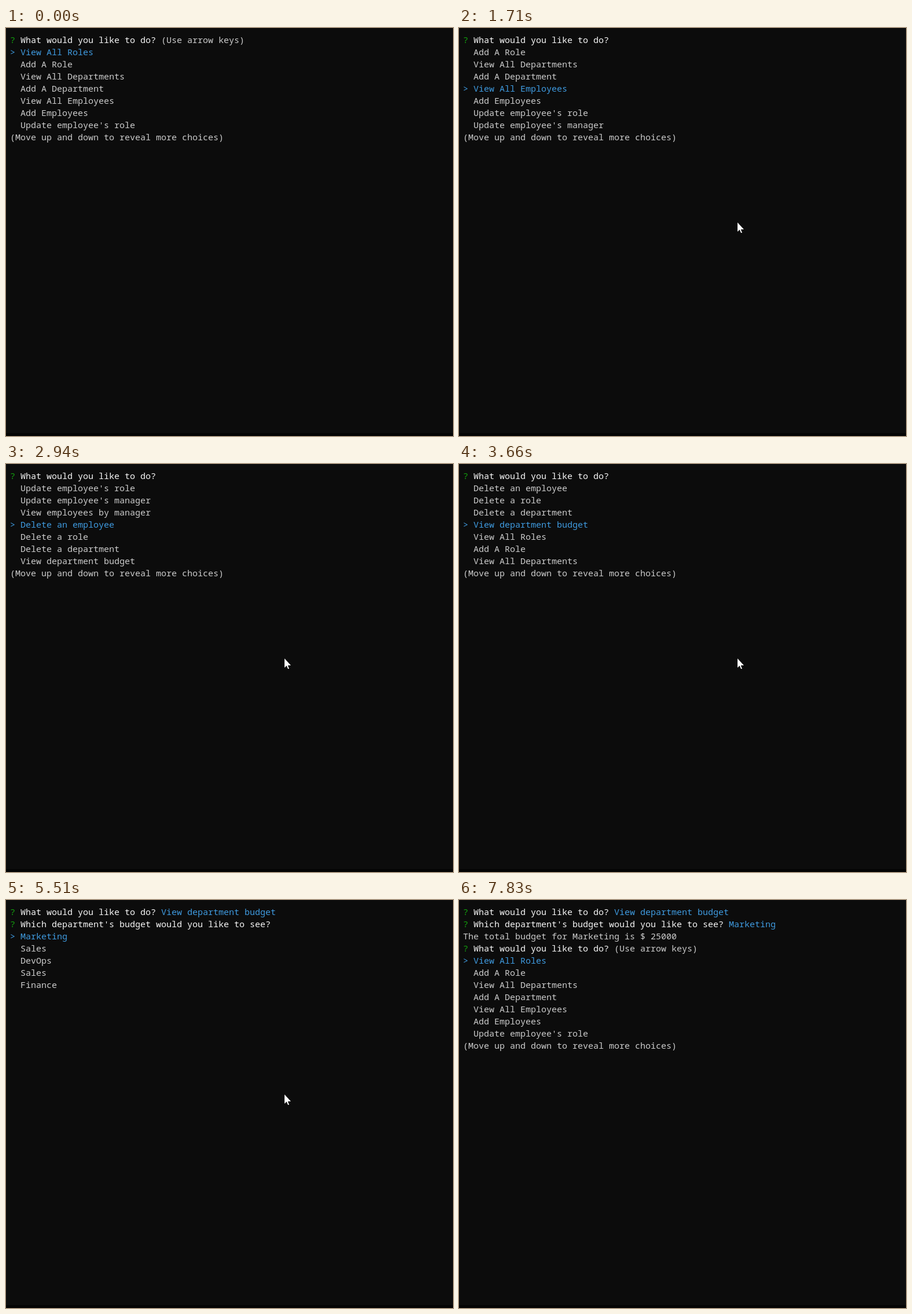
An HTML page with a canvas that plays this animation: 772 px wide and 705 px high, repeating every 8.53 s.

```html
<!DOCTYPE html>
<html lang="en">
<head>
<meta charset="utf-8">
<title>Terminal menu</title>
<style>
html, body { margin: 0; height: 100%; overflow: hidden; background: #0c0c0c; }
canvas { display: block; }
</style>
</head>
<body>
<canvas id="stage" width="772" height="705"></canvas>
<script>
const LOOP = 8530;
const WHITE = '#f8f8f8', GREY = '#cccccc', BLUE = '#3f9be0', GREEN = '#13a10e';
const ctx = document.getElementById('stage').getContext('2d');

const MENU = [
  'View All Roles', 'Add A Role', 'View All Departments', 'Add A Department',
  'View All Employees', 'Add Employees', "Update employee's role",
  "Update employee's manager", 'View employees by manager', 'Delete an employee',
  'Delete a role', 'Delete a department', 'View department budget'
];
const DEPARTMENTS = ['Marketing', 'Sales', 'DevOps', 'Sales', 'Finance'];
const TASK = 'What would you like to do?';
const BUDGET = "Which department's budget would you like to see?";
const HINT = '(Use arrow keys)';

// Times at which the menu selection moves down by one
const DOWN = [1080, 1310, 1540, 1710, 1860, 2010, 2180, 2560, 2940, 3170, 3340, 3660];
const CHOSEN = 4420, DEPT_DOWN = 5050, DEPT_UP = 5510, ANSWERED = 5970;
const ENTER = 70, CLICK = 300, CLICK_END = 470, LEAVE = 7210, GONE = 7830;
const ENTER_PATH = [[522, 457], [498, 384], [483, 343], [480, 335]];

function write(row, col, text, color) {
  ctx.fillStyle = color;
  ctx.fillText(text, 7 + col * 9, 26 + row * 21);
}

function question(row, text, extra, color) {
  write(row, 0, '?', GREEN);
  write(row, 2, text, WHITE);
  if (extra) write(row, text.length + 3, extra, color);
}

function choices(row, items, active) {
  items.forEach((item, i) => {
    write(row + i, 2, item, i === active ? BLUE : GREY);
  });
  write(row + active, 0, '>', BLUE);
}

function menu(row, selected) {
  question(row, TASK, selected ? '' : HINT, GREY);
  const top = Math.max(0, selected - 3);
  const shown = Array.from({ length: 7 }, (_, i) => MENU[(top + i) % MENU.length]);
  choices(row + 1, shown, selected - top);
  write(row + 8, 0, '(Move up and down to reveal more choices)', GREY);
}

function terminal(t) {
  if (t < CHOSEN) {
    menu(0, DOWN.filter(time => time <= t).length);
    return;
  }
  question(0, TASK, MENU[12], BLUE);
  if (t < ANSWERED) {
    question(1, BUDGET, t < DEPT_DOWN ? HINT : '', GREY);
    choices(2, DEPARTMENTS, t >= DEPT_DOWN && t < DEPT_UP ? 1 : 0);
  } else {
    question(1, BUDGET, DEPARTMENTS[0], BLUE);
    write(2, 0, 'The total budget for Marketing is $ 25000', GREY);
    menu(3, 0);
  }
}

function pointerAt(t) {
  if (t < LEAVE) {
    const step = Math.floor((t - ENTER) / ((CLICK - ENTER) / 3) + 1e-6);
    return ENTER_PATH[Math.min(3, step)];
  }
  const step = Math.floor((t - LEAVE) / ((GONE - LEAVE) / 8)) + 1;
  const u = Math.pow(step / 8, 1.5);
  return [Math.round(480 + 205 * u), Math.round(335 + 355 * u)];
}

function pointer(t) {
  if (t < ENTER || t >= GONE) return;
  const [x, y] = pointerAt(t);
  if (t >= CLICK && t < CLICK_END) {
    ctx.fillStyle = 'rgba(255, 255, 0, 0.47)';
    ctx.beginPath();
    ctx.arc(x, y, 12, 0, Math.PI * 2);
    ctx.fill();
  }
  ctx.save();
  ctx.translate(x + 1, y + 1);
  const arrow = new Path2D('M0 0V16L3.6 12.6L6 18H8L5.8 12H11Z');
  ctx.strokeStyle = '#000';
  ctx.stroke(arrow);
  ctx.fillStyle = '#fff';
  ctx.fill(arrow);
  ctx.restore();
}

function draw(now) {
  const t = now % LOOP;
  ctx.fillStyle = '#0c0c0c';
  ctx.fillRect(0, 0, 772, 705);
  ctx.fillStyle = '#040404';
  ctx.fillRect(0, 700, 772, 5);
  ctx.font = '15px "Noto Sans Mono", "DejaVu Sans Mono", monospace';
  terminal(t);
  pointer(t);
}

let start;
function tick(now) {
  start ??= now;
  draw(now - start);
  requestAnimationFrame(tick);
}
draw(0);
requestAnimationFrame(tick);
</script>
</body>
</html>
```
